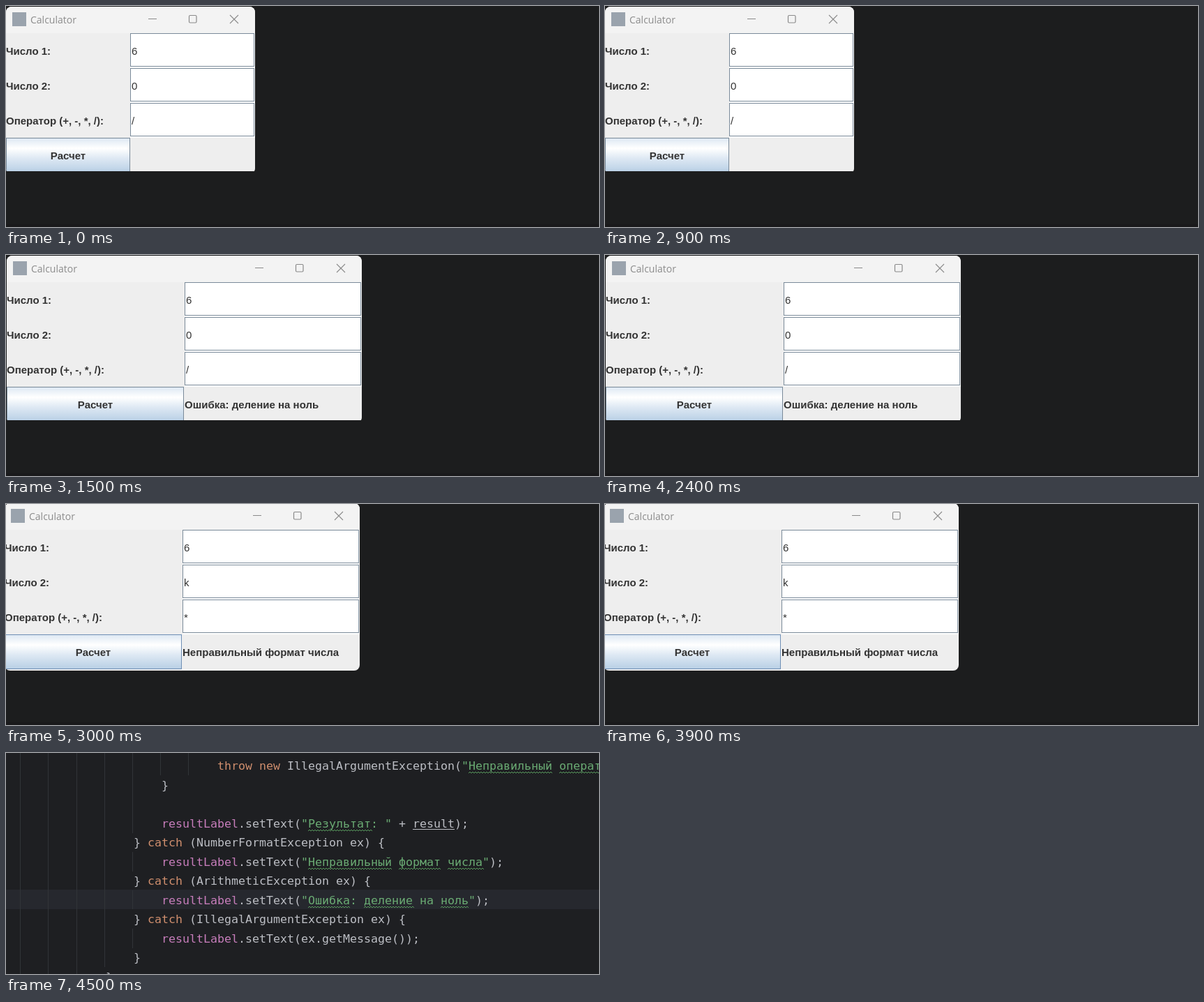
Write an HTML page that moves like this. It is 850 px wide and 317 px high and loops after 6 s.

```html
<!DOCTYPE html>
<html lang="ru">
<head>
<meta charset="utf-8">
<title>Calculator</title>
<style>
html, body { margin: 0; width: 100%; height: 100%; overflow: hidden; background: #1c1d1e; }
svg { display: block; }
text { white-space: pre; }
.ui { font: 15px "Liberation Sans", Arial, sans-serif; fill: #333; }
.bold { font-weight: bold; }
.title { font: 14px "Open Sans", sans-serif; fill: #8c8c8c; }
.code { font: 16.61px "DejaVu Sans Mono", monospace; fill: #bcbec4; }
.key { fill: #cf8e6d; }
.str { fill: #6aab73; }
.field { fill: #c77dbb; }
</style>
</head>
<body>
<svg id="stage" width="850" height="317" viewBox="0 0 850 317">
  <defs>
    <linearGradient id="metal" x1="0" y1="0" x2="0" y2="1">
      <stop offset="0" stop-color="#dde8f3"/>
      <stop offset=".3" stop-color="#fff"/>
      <stop offset=".6" stop-color="#dde8f3"/>
      <stop offset="1" stop-color="#b8cfe5"/>
    </linearGradient>
    <clipPath id="cut"><rect id="cutBox" width="850"/></clipPath>
    <clipPath id="shape"><rect id="shapeBox" y="1" height="240" rx="8"/></clipPath>
  </defs>
  <g id="desktop">
    <rect width="850" height="317" fill="#1c1d1e"/>
    <rect y="313" width="850" height="4" fill="#19191b"/>
    <g clip-path="url(#cut)"><g id="win"></g></g>
  </g>
  <g id="editor"></g>
</svg>
<script>
const $ = id => document.getElementById(id);
const STEP = 1500, LOOP = 6000;

const rect = (x, y, w, h, fill, more = '') =>
  `<rect x="${x}" y="${y}" width="${w}" height="${h}" fill="${fill}" ${more}/>`;
const text = (x, y, cls, s, more = '') =>
  `<text x="${x}" y="${y}" class="${cls}" ${more}>${s}</text>`;
const path = (d, stroke, more = '') =>
  `<path d="${d}" fill="none" stroke="${stroke}" ${more}/>`;

const labels = ['Число 1:', 'Число 2:', 'Оператор (+, -, *, /):'];
const states = [
  { x: 0, y: 0, w: 357, col: 178, cut: 237, values: ['6', '0', '/'], result: '', edge: '#7a8a99' },
  { x: 1, y: 0, w: 509, col: 255, cut: 237, values: ['6', '0', '/'],
    result: 'Ошибка: деление на ноль', edge: '#7a8a99' },
  { x: -2, y: -2, w: 509, col: 255, cut: 240, values: ['6', 'k', '*'],
    result: 'Неправильный формат числа', edge: '#6f8fb5' }
];

function titleBar(w) {
  const icons = `M${w - 153} 18.5h12 M${w - 36} 13l12 12 m0 -12l-12 12`;
  return rect(0, 0, w, 39, '#f3f3f3') +
    rect(9, 9, 20, 20, '#9aa3ad') +
    text(35, 25, 'title', 'Calculator') +
    path(icons, '#8a8a8a', 'stroke-width="1.1"') +
    rect(w - 94.5, 13.5, 10.5, 10.5, 'none', 'rx="1.5" stroke="#8a8a8a" stroke-width="1.2"');
}

function row(s, i) {
  const y = 39 + i * 50, w = s.w - s.col;
  return text(0, y + 31, 'ui bold', labels[i]) +
    rect(s.col, y, w, 50, '#fff') +
    rect(s.col + .5, y + .5, w - 2, 47, '#fff', 'stroke="#7a8a99"') +
    text(s.col + 2, y + 31, 'ui', s.values[i]);
}

function calculator(s) {
  const bw = s.col - (s.col > 200 ? 1 : 0);
  return `<g transform="translate(${s.x} ${s.y})"><g clip-path="url(#shape)">` +
    rect(0, 0, s.w, 242, '#eee') + titleBar(s.w) +
    labels.map((_, i) => row(s, i)).join('') +
    rect(.5, 189.5, bw - 1, 49, 'url(#metal)', `stroke="${s.edge}"`) +
    text(bw / 2, 220, 'ui bold', 'Расчет', 'text-anchor="middle"') +
    text(s.col, 220, 'ui bold', s.result) + '</g></g>';
}

// Code lines: [line, x, parts]; a part is [class, string].
const set = ['field', 'resultLabel'], call = ['', '.setText('];
const handler = name => [['', '} '], ['key', 'catch'], ['', ` (${name} ex) {`]];
const message = s => [set, call, ['str', `"${s}"`], ['', ');']];
const lines = [
  [0, 303, [['key', 'throw new '], ['', 'IllegalArgumentException('], ['str', '"Неправильный оператор"']]],
  [1, 223, [['', '}']]],
  [3, 223, [set, call, ['str', '"Результат: "'], ['', ' + result);']]],
  [4, 183, handler('NumberFormatException')],
  [5, 223, message('Неправильный формат числа')],
  [6, 183, handler('ArithmeticException')],
  [7, 223, message('Ошибка: деление на ноль')],
  [8, 183, handler('IllegalArgumentException')],
  [9, 223, [set, ['', '.setText(ex.getMessage());']]],
  [10, 183, [['', '}']]],
  [11, 143, [['', '}']]]
];
const baseline = n => 24 + n * 27.5;

function wave(x, y, chars) {
  let d = `M${x} ${y + 2}`;
  for (let i = 0; i < chars * 2.5; i++) d += 'l2 -2l2 2';
  return path(d, '#599b5e', 'stroke-width="1"');
}

function codeLine([n, x, parts]) {
  const y = Math.round(baseline(n));
  const all = parts.map(p => p[1]).join('');
  const spans = parts.map(([c, s]) => `<tspan class="${c}">${s}</tspan>`).join('');
  const marks = [...all.matchAll(/[А-Яа-я]{3,}/g)]
    .map(m => wave(x + m.index * 10, y + 3, m[0].length)).join('');
  const at = all.indexOf('result)');
  const line = at < 0 ? '' : path(`M${x + at * 10} ${y + 2.5}h60`, '#bcbec4');
  return text(x, y, 'code', spans) + marks + line;
}

function editor() {
  const guides = [
    [20, 0, 317], [60, 0, 317], [101, 0, 317], [141, 0, 307],
    [181, 0, 115], [181, 142, 170], [181, 197, 224], [181, 252, 280],
    [221, 0, 32], [261, 0, 32]
  ];
  return rect(0, 0, 850, 317, '#1e1f22') + rect(0, 196, 850, 28, '#26282e') +
    guides.map(([x, a, b]) => rect(x, a, 1, b - a, '#313438')).join('') +
    lines.map(codeLine).join('');
}

$('editor').innerHTML = editor();
let shown = -1;

function draw(time) {
  const n = Math.floor(time % LOOP / STEP);
  if (n !== shown) {
    shown = n;
    const s = states[n];
    $('desktop').style.display = s ? '' : 'none';
    $('editor').style.display = s ? 'none' : '';
    if (s) {
      $('cutBox').setAttribute('height', s.cut);
      $('shapeBox').setAttribute('width', s.w);
      $('win').innerHTML = calculator(s);
    }
  }
}

const start = performance.now();
function tick() {
  draw(performance.now() - start);
  requestAnimationFrame(tick);
}
tick();
</script>
</body>
</html>
```
